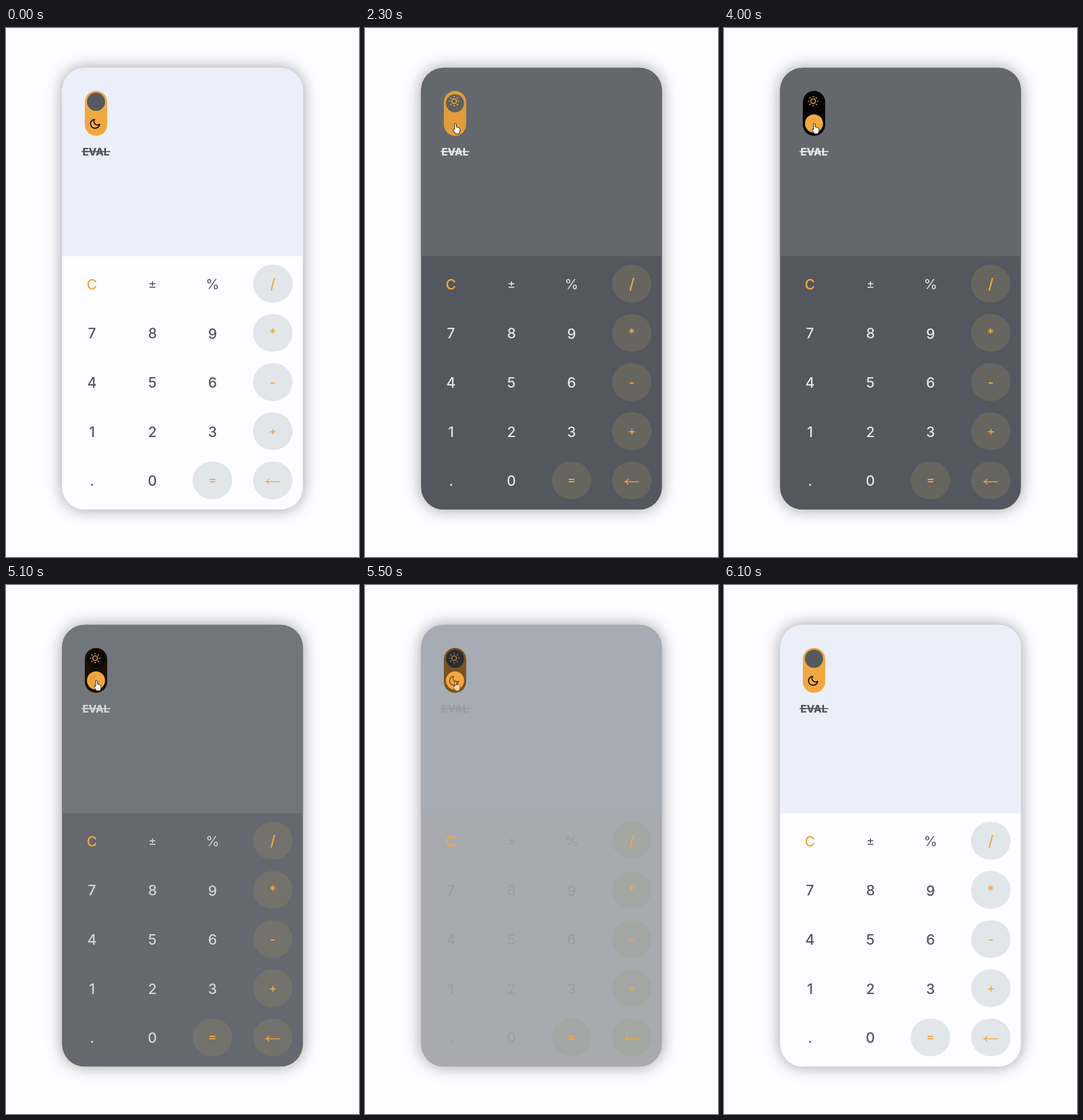
Animation of 600x900 px, one loop 7 s. Source, as an HTML page with a canvas:

```html
<!DOCTYPE html>
<html lang="en">
<head>
<meta charset="utf-8">
<title>Calculator theme switch</title>
<style>
  html, body { margin: 0; width: 100%; height: 100%; overflow: hidden; background: #fefdff; }
  canvas { display: block; width: 600px; height: 900px; }
</style>
</head>
<body>
<canvas id="stage" width="600" height="900"></canvas>
<script>
const W = 600, H = 900, LOOP = 7000, STEP = 100;
const ORANGE = [242, 168, 64], KNOB = [86, 89, 94], BLACK = [0, 0, 0];
const LIGHT = { display: '#eaeffa', pad: '#fefdff', key: '#e1e6e9', text: '#55575c', accent: '#efa848' };
const DARK = { display: '#64676b', pad: '#54575d', key: '#67655f', text: '#e1e5ea', accent: '#f2a840' };

const COLS = [146.3, 249, 351, 453.5];
const ROWS = ['C±%/', '789*', '456-', '123+', '.0=←'];
// Offset from the key centre, size and weight where a sign differs from the digits
const SIGNS = {
  '±': [1.5, 21, 400], '%': [0.5, 23.5, 400], '/': [0.5, 25, 500], '*': [-3, 22, 500],
  '-': [1.5, 21, 500], '+': [0.5, 20, 500], '=': [0.5, 21, 500], '.': [7.5, 24, 500]
};

const moon = new Path2D('M21 12.8A9 9 0 1 1 11.2 3A7 7 0 0 0 21 12.8Z');
const hand = new Path2D('M3.2 11V2a1.5 1.5 0 0 1 3 0V6.8Q8 6 8.4 7.4Q10 6.8 10.6 8.2Q12.4 7.8 12.4 9.6V13.5L11 18H5L1 12.2Q0 10 1.6 10Z');
const arrow = new Path2D('M.5 .5V15.5L4 12.2L6.4 18L8.8 17L6.4 11.4H11.2Z');

const clamp = v => Math.min(1, Math.max(0, v));
const mix = (a, b, p) => 'rgb(' + a.map((v, i) => Math.round(v + (b[i] - v) * p)) + ')';
const smooth = p => p * p * (3 - 2 * p);

// The CSS "ease" curve
function ease(x) {
  if (x <= 0 || x >= 1) return clamp(x);
  const curve = (a, b, s) => 3 * a * s * (1 - s) ** 2 + 3 * b * s * s * (1 - s) + s ** 3;
  let lo = 0, hi = 1;
  for (let i = 0; i < 24; i++) {
    const mid = (lo + hi) / 2;
    if (curve(0.25, 0.25, mid) < x) lo = mid; else hi = mid;
  }
  return curve(0.1, 1, lo);
}

function box(c, x, y, w, h, r, fill) {
  c.beginPath();
  c.roundRect(x, y, w, h, r);
  c.fillStyle = fill;
  c.fill();
}

function disc(c, x, y, r, fill) {
  c.beginPath();
  c.arc(x, y, r, 0, Math.PI * 2);
  c.fillStyle = fill;
  c.fill();
}

// Centres the ink of a glyph on a point
function glyph(c, ch, x, y, size, weight, fill) {
  c.font = `${weight} ${size}px Inter, sans-serif`;
  c.fillStyle = fill;
  c.textAlign = 'left';
  const m = c.measureText(ch);
  c.fillText(ch, x + (m.actualBoundingBoxLeft - m.actualBoundingBoxRight) / 2,
    y + (m.actualBoundingBoxAscent - m.actualBoundingBoxDescent) / 2);
}

function backArrow(c, x, y, color) {
  c.strokeStyle = color;
  c.lineWidth = 1.5;
  c.beginPath();
  c.moveTo(x + 12, y);
  c.lineTo(x - 11, y);
  c.moveTo(x - 6.5, y - 4.5);
  c.quadraticCurveTo(x - 8, y - 1, x - 11.5, y);
  c.quadraticCurveTo(x - 8, y + 1, x - 6.5, y + 4.5);
  c.stroke();
}

function sun(c, x, y) {
  c.strokeStyle = mix(ORANGE, ORANGE, 0);
  c.lineWidth = 1.7;
  c.lineCap = 'round';
  c.beginPath();
  c.arc(x, y, 4, 0, Math.PI * 2);
  for (let i = 0; i < 8; i++) {
    const a = i * Math.PI / 4, dx = Math.cos(a), dy = Math.sin(a);
    c.moveTo(x + dx * 7.2, y + dy * 7.2);
    c.lineTo(x + dx * 8.2, y + dy * 8.2);
  }
  c.stroke();
  c.lineCap = 'butt';
}

function toggle(c, dark, p) {
  box(c, 134, 107, 38, 76.5, 19, mix(ORANGE, BLACK, p));
  disc(c, 153, 125.5 + 37 * p, 15.4, mix(KNOB, ORANGE, p));
  if (dark) {
    sun(c, 151.5, 124.5);
  } else {
    c.save();
    c.translate(151.4, 163);
    c.scale(0.86, 0.86);
    c.translate(-12, -12);
    c.strokeStyle = '#000';
    c.lineWidth = 2;
    c.lineJoin = 'round';
    c.stroke(moon);
    c.restore();
  }
}

function pointer(c, shape, x, y) {
  c.save();
  c.translate(x, y);
  c.fillStyle = '#fff';
  c.fill(shape);
  c.strokeStyle = '#111';
  c.lineWidth = 1;
  c.lineJoin = 'round';
  c.stroke(shape);
  c.restore();
}

function keys(c, skin) {
  ROWS.forEach((row, r) => [...row].forEach((ch, k) => {
    const x = COLS[k], y = 435.1 + 83.65 * r;
    const round = k === 3 || ch === '=';
    if (round) box(c, x - 33.5, y - 32, 67, 64, 32, skin.key);
    const color = round || ch === 'C' ? skin.accent : skin.text;
    if (ch === '←') return backArrow(c, x, y + 2.2, color);
    const [dy, size, weight] = SIGNS[ch] || [0.7, 24, 500];
    glyph(c, ch, x, y + dy, size, weight, color);
  }));
}

function scene(c, dark, p) {
  const skin = dark ? DARK : LIGHT;
  c.fillStyle = '#fefdff';
  c.fillRect(0, 0, W, H);
  c.save();
  c.shadowColor = 'rgba(0,0,0,.38)';
  c.shadowBlur = 28;
  box(c, 95.3, 67.8, 409.4, 751.5, 38, skin.pad);
  c.restore();
  box(c, 95.3, 67.8, 409.4, 320.4, [38, 38, 0, 0], skin.display);
  toggle(c, dark, p);
  glyph(c, 'EVAL', 153, 210.3, 17.5, 800, skin.text);
  c.fillRect(128.5, 209.4, 49, 1.8);
  keys(c, skin);
}

function cursor(c, t) {
  if (t < 600 || t >= 6000) return;
  if (t >= 1400) return pointer(c, hand, 149, 162);
  const s = smooth((t - 600) / 700), q = 1 - s;
  pointer(c, arrow, 35 + 114 * s, 165 * q * q + 286 * q * s + 161 * s * s);
}

const ctx = document.getElementById('stage').getContext('2d');
const rest = document.createElement('canvas');
rest.width = W;
rest.height = H;
scene(rest.getContext('2d'), false, 0);

function draw(now) {
  const t = Math.floor(now % LOOP / STEP) * STEP;
  const dark = t >= 2300 && t < 6000;
  if (dark) scene(ctx, true, ease((t - 2250) / 600));
  else ctx.drawImage(rest, 0, 0);
  cursor(ctx, t);
  if (dark && t > 5000) {
    ctx.globalAlpha = (t - 5000) / 1000;
    ctx.drawImage(rest, 0, 0);
    ctx.globalAlpha = 1;
  }
}

const start = performance.now();
function tick() {
  draw(performance.now() - start);
  requestAnimationFrame(tick);
}
tick();
</script>
</body>
</html>
```
